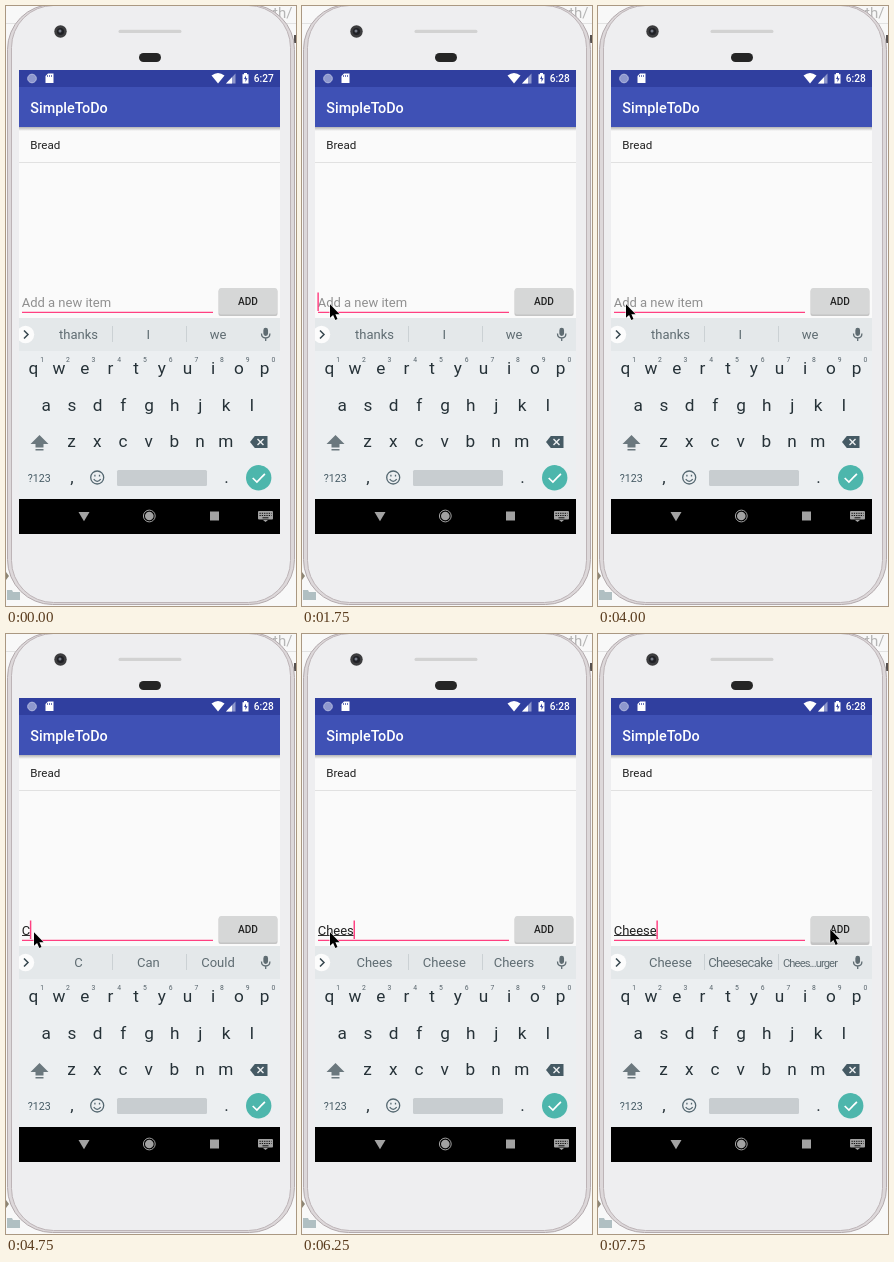
Write an HTML page that moves like this. It is 290 px wide and 600 px high and loops after 8000 ms.

```html
<!DOCTYPE html>
<html lang="en">
<head>
<meta charset="utf-8">
<title>Todo app demo</title>
<style>
html, body { margin: 0; width: 100%; height: 100%; overflow: hidden; background: #f8f8f8; }
svg { display: block; width: 290px; height: 600px; }
text { font-family: Roboto, "Noto Sans", sans-serif; }
.mid { text-anchor: middle; }
.medium { font-weight: 500; }
.suggestion { font-size: 13px; fill: #5f6c72; }
.key { font-size: 17.2px; fill: #263238; }
.hint { font-size: 6.8px; fill: #55626a; }
</style>
</head>
<body>
<svg viewBox="0 0 290 600">
  <defs>
    <linearGradient id="shade" x1="0" y1="0" x2="0" y2="1">
      <stop offset="0" stop-color="#000" stop-opacity=".28"/>
      <stop offset="1" stop-color="#000" stop-opacity="0"/>
    </linearGradient>
    <clipPath id="screen"><path d="M13 64H274V528H13z"/></clipPath>
  </defs>

  <!-- desktop behind the phone -->
  <rect width="290" height="600" fill="#f8f8f8"/>
  <path d="M0 17.5H290" stroke="#e2e2e2"/>
  <text x="267" y="12" font-size="15" fill="#b5b5b5">th/</text>
  <path d="M1 584h5l1 2h7v8H1z" fill="#b0bfc2"/>
  <path d="M0 566l3 4-3 4z" fill="#8d8574"/>
  <path d="M288 29h2v8h-2z" fill="#55504f"/>

  <!-- phone body -->
  <rect x="1.500" y="-1.500" width="287" height="600" rx="45" fill="#ddd8da" stroke="#b3aaad"/>
  <rect x="5.500" y="-.500" width="279" height="597" rx="42" fill="#eeeef0" stroke="#bdb4b7"/>
  <circle cx="54.500" cy="25.500" r="6.200" fill="#3c3c3e"/>
  <circle cx="54.500" cy="25.500" r="3.600" fill="#202126"/>
  <circle cx="54" cy="25" r="1.500" fill="#777c88"/>
  <rect x="112.500" y="23.800" width="63" height="3.200" rx="1.600" fill="#d2d2d2"/>
  <rect x="133" y="47" width="22" height="9" rx="4.500" fill="#252525"/>

  <g clip-path="url(#screen)">
    <path d="M13 64H274V312H13z" fill="#fafafa"/>
    <path d="M13 64H274V81H13z" fill="#303f9f"/>
    <path d="M13 81H274V121H13z" fill="#3f51b5"/>
    <path d="M13 121H274V125H13z" fill="url(#shade)"/>

    <!-- status bar -->
    <circle cx="26" cy="72.500" r="4.300" fill="#8e98ce" stroke="#b3bae0"/>
    <path d="M42 67.500h5.500v9.500h-8v-7z" fill="#fff"/>
    <path d="M41.500 69v2M43.500 69v2M45.500 69v2" stroke="#303f9f" stroke-width=".7"/>
    <path d="M205.500 69.500Q212 64.500 218.500 69.500L212 77.500z" fill="#fff"/>
    <path d="M220 77.500L229.500 67.500V77.500z" fill="#8f98cc"/>
    <path d="M220 77.500L226 71.200V77.500z" fill="#fff"/>
    <path d="M238 67h3v1.200h1.500v9.300h-6v-9.300h1.500z" fill="#fff"/>
    <path d="M240 69.500l-2 3.500h1.500v3l2-3.700H240z" fill="#303f9f"/>
    <text id="clock" class="medium" x="247.800" y="76" font-size="10.150" fill="#fff"></text>

    <text class="medium" x="24.300" y="107" font-size="14.400" fill="#fff">SimpleToDo</text>
    <text x="24.300" y="143" font-size="11.600" fill="#222">Bread</text>
    <path d="M13 156.500H274" stroke="#e1e1e1"/>

    <!-- input row -->
    <text id="placeholder" x="15.700" y="300.500" font-size="13" fill="#909090">Add a new item</text>
    <text id="entry" x="15.700" y="300.500" font-size="13" fill="#222"></text>
    <path id="underline" stroke="#333"/>
    <path d="M16 306.450H207" stroke="#ff4081" stroke-width="1.300"/>
    <rect id="caret" y="286.500" width="1.450" height="18.500" fill="#ff4081"/>
    <rect id="buttonShadow" x="212.500" y="283" width="59" height="27" rx="2" fill="#c4c4c4"/>
    <rect x="213" y="282" width="58" height="26.500" rx="2" fill="#d6d7d7"/>
    <text class="mid medium" x="242" y="299" font-size="10.150" fill="#222">ADD</text>

    <!-- keyboard -->
    <path d="M13 312H274V493H13z" fill="#eceff1"/>
    <path d="M13 312H274V345H13z" fill="#e4e8ea"/>
    <circle cx="19.500" cy="328.500" r="8.700" fill="#fcfcfc"/>
    <path d="M18 324.500l4 4-4 4" fill="none" stroke="#37474f" stroke-width="1.500"/>
    <path d="M106.500 320v16M180.500 320v16" stroke="#cbd1d4"/>
    <g id="suggestions"></g>
    <g fill="none" stroke="#5f6c72" stroke-width="1.300">
      <rect x="258" y="322.500" width="3.400" height="6.800" rx="1.700" fill="#5f6c72"/>
      <path d="M255.500 327.500q0 4.500 4.200 4.500t4.200-4.500M259.700 332v3"/>
    </g>
    <g id="keys"></g>
    <path d="M33.500 429l9 9H37.500v3.500H29.500v-3.500H24.500zM29.500 443h8v1.600h-8z" fill="#6b787e"/>
    <path d="M244 436l4.800-6H261.500v12H248.800z" fill="#455a64"/>
    <path d="M251.500 433l6 6M257.500 433l-6 6" stroke="#eceff1" stroke-width="1.400"/>
    <text x="21.800" y="475.500" font-size="10.600" fill="#455a64">?123</text>
    <g fill="none" stroke="#546770" stroke-width="1.300">
      <circle cx="91.200" cy="471.500" r="6.500"/>
      <path d="M87.700 473.200q3.500 4.200 7 0M88.900 468.700v1.800M93.500 468.700v1.800"/>
    </g>
    <rect x="111" y="464" width="90" height="16" rx="1.500" fill="#c8cdd0"/>
    <circle cx="252.700" cy="471.800" r="12.700" fill="#4db6ac"/>
    <path d="M246.700 472l4.200 4 8-8.200" fill="none" stroke="#fff" stroke-width="1.700"/>

    <!-- navigation bar -->
    <path d="M13 493H274V528H13z" fill="#000"/>
    <g fill="#a2a2a2">
      <path d="M72.500 506H83.500L78 515.300z"/>
      <circle cx="143.300" cy="510" r="4.300"/>
      <circle cx="143.300" cy="510" r="5.900" fill="none" stroke="#a2a2a2"/>
      <rect x="204" y="505.500" width="9" height="9"/>
      <rect x="252" y="505" width="15" height="8.500" rx="1"/>
      <path d="M257 514h5l-2.500 2z"/>
    </g>
    <path d="M253.500 507.300H265.500M253.500 509.500H265.500" stroke="#000" stroke-width=".9" stroke-dasharray="1.300 1"/>
    <path d="M256.500 511.800h6" stroke="#000" stroke-width=".9"/>
  </g>

  <path id="pointer" d="M0 0V13.500L3.100 10.700 5.300 15.700 7.500 14.700 5.400 9.900H9.600z"
        fill="#000" stroke="#fff" stroke-width="1" paint-order="stroke"/>
</svg>
<script>
const LOOP = 8000;
const $ = id => document.getElementById(id);

function addText(parent, cls, x, y, content = "") {
  const el = document.createElementNS("http://www.w3.org/2000/svg", "text");
  el.setAttribute("class", cls);
  el.setAttribute("x", x);
  el.setAttribute("y", y);
  el.textContent = content;
  return parent.appendChild(el);
}

const keyRows = [["qwertyuiop", 27.3, 368], ["asdfghjkl", 40.2, 404.5], ["zxcvbnm", 65.5, 441]];
keyRows.forEach(([letters, left, y], row) => [...letters].forEach((letter, i) => {
  const x = left + i * 25.7;
  addText($("keys"), "key mid", x, y, letter);
  if (row === 0) addText($("keys"), "hint mid", x + 8.8, 356, (i + 1) % 10);
}));
addText($("keys"), "key mid", 66, 477, ",");
addText($("keys"), "key mid", 220.5, 477, ".");

const slots = [72.5, 142.3, 212].map(x => addText($("suggestions"), "suggestion mid", x, 333));

// Each step: start time, typed text, suggestions
const typing = [
  [0, "", "thanks", "I", "we"],
  [4750, "C", "C", "Can", "Could"],
  [5250, "Ch", "Ch", "Check", "Children"],
  [5750, "Che", "Che", "Check", "Cheers"],
  [6000, "Chee", "Chee", "Cheese", "Cheers"],
  [6250, "Chees", "Chees", "Cheese", "Cheers"],
  [6500, "Cheese", "Cheese", "Cheesecake", "Chees...urger"]
];
// Each step: start time, pointer x, y
const pointerPath = [
  [0, -50, -50], [250, 203, 103], [500, 29, 196], [750, 28, 282], [1000, 27.5, 299],
  [1250, 28, 298.3], [7000, 46.5, 297.5], [7250, 211.5, 273], [7500, 231.5, 294.5], [7750, 232.3, 295.3]
];
const caretToggles = [250, 750, 1500, 2000, 2500, 3000, 3500, 4000, 4500, 7000, 7500];

const stepAt = (steps, t) => steps.findLast(step => step[0] <= t);

// Long words get a smaller, tighter setting
function fitSuggestion(el, word) {
  const [size, spacing] = word.length > 12 ? [11.2, -.9] : word.length > 9 ? [13, -.6] : [13, 0];
  el.textContent = word;
  el.style.fontSize = size + "px";
  el.style.letterSpacing = spacing + "px";
}

let shownEntry = null;
function showEntry([, entry, ...words]) {
  if (entry === shownEntry) return;
  shownEntry = entry;
  $("entry").textContent = entry;
  $("placeholder").style.display = entry ? "none" : "";
  const end = 15.7 + (entry ? $("entry").getComputedTextLength() : 0);
  $("underline").setAttribute("d", entry ? `M16 301.500H${end}` : "");
  $("caret").setAttribute("x", end - .3);
  slots.forEach((slot, i) => fitSuggestion(slot, words[i]));
}

function draw() {
  const t = performance.now() % LOOP;
  showEntry(stepAt(typing, t));
  const [, x, y] = stepAt(pointerPath, t);
  $("pointer").setAttribute("transform", `translate(${x} ${y})`);
  const toggles = caretToggles.filter(time => time <= t).length;
  $("caret").style.opacity = toggles % 2;
  $("clock").textContent = t < 250 ? "6:27" : "6:28";
  $("buttonShadow").setAttribute("height", t < 7750 ? 27 : 28);
  requestAnimationFrame(draw);
}
draw();
</script>
</body>
</html>
```
